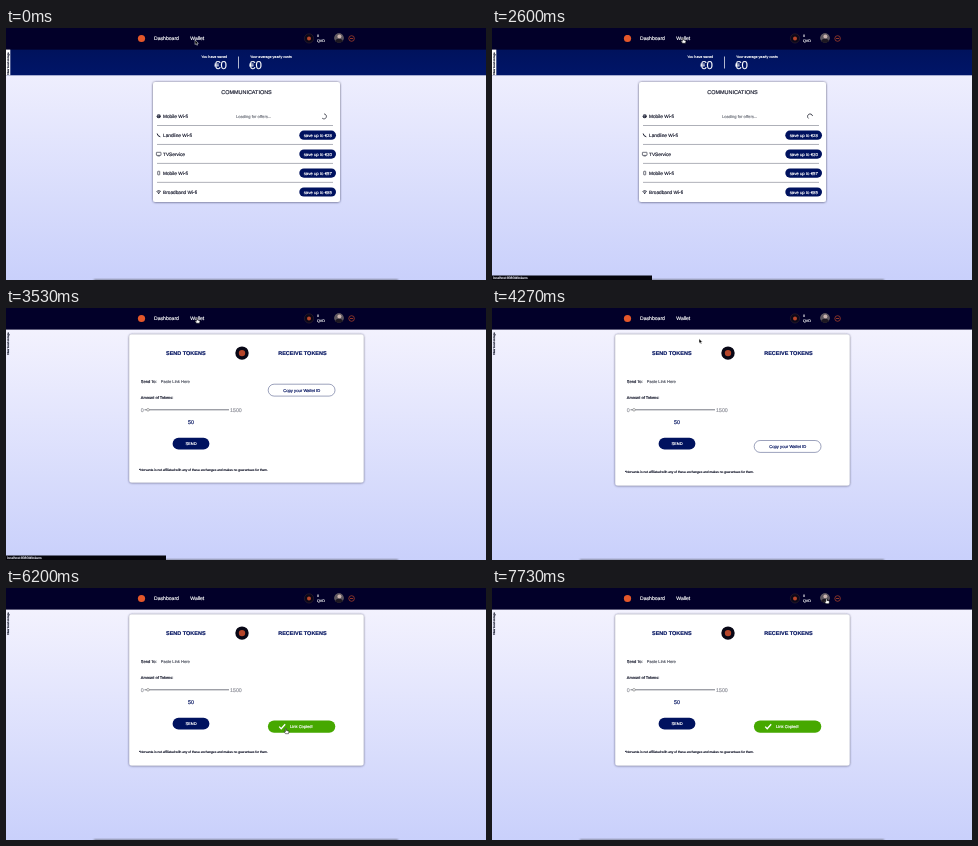
Write an HTML page that moves like this. It is 480 by 252 pixels and loops after 8 s.

```html
<!DOCTYPE html>
<html lang="en">
<head>
<meta charset="utf-8">
<title>Wallet walkthrough</title>
<style>
  html, body { margin: 0; width: 100%; height: 100%; overflow: hidden; background: #d0d6fc; }
  svg { display: block; width: 100vw; height: 100vh; }
  text { font-family: "Liberation Sans", Arial, sans-serif; text-rendering: geometricPrecision; }
</style>
</head>
<body>
<svg id="stage" viewBox="0 0 480 252" xmlns="http://www.w3.org/2000/svg">
  <defs>
    <linearGradient id="sky" x1="0" y1="0" x2="0" y2="1">
      <stop offset="0" stop-color="#f3f2fe"/>
      <stop offset="1" stop-color="#c9d0fb"/>
    </linearGradient>
    <linearGradient id="bar" x1="0" y1="0" x2="0" y2="1">
      <stop offset="0" stop-color="#00125c"/>
      <stop offset="1" stop-color="#001568"/>
    </linearGradient>
    <filter id="soft" x="-5%" y="-5%" width="110%" height="110%">
      <feDropShadow dx="0" dy="0.2" stdDeviation="1.1" flood-color="#20243c" flood-opacity=".8"/>
    </filter>
    <filter id="blur" x="-5%" y="-400%" width="110%" height="900%">
      <feGaussianBlur stdDeviation="1 .5"/>
    </filter>
    <clipPath id="face"><circle cx="333" cy="10" r="5"/></clipPath>
  </defs>
  <rect y="21" width="480" height="231" fill="url(#sky)"/>
  <g id="offers"></g>
  <g id="wallet"></g>
  <g id="header"></g>
  <rect x="88" y="250.6" width="304" height="1.4" fill="#8d92aa" opacity=".75" filter="url(#blur)"/>
  <g id="status"></g>
  <g id="pointer"></g>
</svg>
<script>
const LOOP = 8000;
const NAVY = '#00125f', INK = '#15182b', ORANGE = '#e4572a', RUST = '#b5452a';
const $ = id => document.getElementById(id);
const show = (el, on) => el.setAttribute('display', on ? 'inline' : 'none');

// Text placed by its vertical middle, thickened by a hairline stroke
const text = (s, x, y, size, fill = INK, extra = '') =>
  `<text x="${x}" y="${(y + size * 0.36).toFixed(2)}" font-size="${size}" fill="${fill}" ` +
  `stroke="${fill}" stroke-width=".16" ${extra}>${s}</text>`;
const MID = 'text-anchor="middle"', END = 'text-anchor="end"', BOLD = 'font-weight="700"';
const rect = (x, y, w, h, r, fill, extra = '') =>
  `<rect x="${x}" y="${y}" width="${w}" height="${h}" rx="${r}" fill="${fill}" ${extra}/>`;
const dot = (x, y, r, fill, extra = '') =>
  `<circle cx="${x}" cy="${y}" r="${r}" fill="${fill}" ${extra}/>`;
const line = (d, stroke, width, extra = '') =>
  `<path d="${d}" fill="none" stroke="${stroke}" stroke-width="${width}" ${extra}/>`;
const sideLabel = () =>
  `<g transform="translate(2.4 47) rotate(-90)">${text('Clear local storage', 0, 0, 2.7)}</g>`;

function drawHeader() {
  $('header').innerHTML =
    rect(0, 0, 480, 21.6, 0, '#020029') +
    dot(135.5, 10.5, 3.6, ORANGE) +
    text('Dashboard', 148, 10.4, 5.1, '#fff') +
    text('Wallet', 184.3, 10.4, 5.1, '#fff') +
    dot(303, 10.4, 4.6, '#0b0718', 'stroke="#3a2836" stroke-width=".5"') +
    dot(303, 10.4, 2, RUST) +
    text('0', 311, 8, 3.6, '#fff') +
    text('QVD', 311, 12.8, 3.6, '#fff') +
    `<g clip-path="url(#face)">${dot(333, 10, 5, '#5d565f')}${dot(333.4, 8.4, 2, '#c9b3ae')}` +
    `<ellipse cx="333" cy="14.8" rx="4.2" ry="4" fill="#1d1822"/></g>` +
    dot(345.6, 10.5, 2.8, 'none', `stroke="${RUST}" stroke-width=".7"`) +
    line('M344 10.5H347.2', RUST, .8);
}

function drawOffers() {
  const icons = [
    dot(0, 0, 2, INK) + line('M-1.7 -.4H1.4M-.2 -1.8Q-1.2 0 .2 1.7', '#c8cbd8', .4),
    line('M-1.5 -1.6Q-1.3 1 1.6 1.6', INK, 1),
    rect(-2.3, -1.8, 4.6, 3.1, .4, 'none', `stroke="${INK}" stroke-width=".6"`) + line('M-1.2 2H1.2', INK, .5),
    rect(-1, -1.8, 2, 3.6, .4, 'none', `stroke="${INK}" stroke-width=".6"`),
    line('M-2.2 -.5Q0 -2.3 2.2 -.5M-1.3 .5Q0 -.6 1.3 .5', INK, .8) + dot(0, 1.4, .6, INK)
  ];
  const names = ['Mobile Wi-fi', 'Landline Wi-fi', 'TVService', 'Mobile Wi-fi', 'Broadband Wi-fi'];
  const savings = [0, 28, 30, 57, 85];
  const rows = names.map((name, i) => {
    const y = 88.2 + i * 18.95;
    return `<g transform="translate(152.7 ${y})">${icons[i]}</g>` +
      text(name, 157, y, 4.75) +
      (i < 4 ? line(`M151 ${y + 9.3}H327`, '#777b88', .6) : '') +
      (i ? rect(293.3, y - 4.6, 36.7, 9.2, 4.6, NAVY) +
        text('save up to €' + savings[i], 311.8, y, 4.3, '#fff', MID) : '');
  }).join('');
  $('offers').innerHTML =
    rect(0, 21, 480, 26.3, 0, 'url(#bar)') +
    rect(0, 21, 4.3, 26.3, 0, '#fff') + sideLabel() +
    text('You have saved', 221, 28.6, 3.65, '#fff', END) +
    text('€0', 221, 36.6, 11.5, '#fff', END) +
    line('M232.5 28.5V40.5', '#fff', .7) +
    text('Your average yearly costs', 244, 28.6, 3.65, '#fff') +
    text('€0', 243, 36.6, 11.5, '#fff') +
    rect(147, 54, 187, 120, 2.5, '#fff', 'filter="url(#soft)"') +
    text('COMMUNICATIONS', 240.5, 64, 5.46, INK, MID) +
    rows +
    text('Loading for offers...', 230, 88.4, 4.1, '#777b84') +
    '<path id="spin" d="M318 85.9A2.5 2.5 0 1 1 316.2 90.2" fill="none" stroke="#30333f" stroke-width=".8"/>';
}

function drawWallet() {
  $('wallet').innerHTML = sideLabel() +
    rect(123.3, 26.6, 234.3, 148, 2.5, '#fff', 'id="panel" filter="url(#soft)"') +
    text('SEND TOKENS', 160, 45.4, 5.5, NAVY, BOLD) +
    text('RECEIVE TOKENS', 272.2, 45.4, 5.5, NAVY, BOLD) +
    dot(236, 45.1, 6.7, '#080716') + dot(236, 45.1, 3.2, RUST) +
    text('Send To:', 134.8, 73.2, 4.05) +
    text('Paste Link Here', 154.8, 73.4, 4.08, '#555966') +
    text('Amount of Tokens:', 134.8, 89.8, 3.95) +
    text('0', 134.8, 101.9, 5.3, '#8e9099') +
    line('M138.5 101.8H223', '#676a74', .9) +
    dot(142, 101.8, 1.3, '#fff', 'stroke="#777" stroke-width=".6"') +
    text('1500', 224, 101.9, 5.3, '#8e9099') +
    text('50', 185, 114, 5.4, NAVY, MID) +
    rect(166.6, 129.8, 36.8, 11.8, 5.9, NAVY) +
    text('SEND', 185, 135.7, 4, '#fff', MID) +
    '<g id="note">' + text('*Norvanta is not affiliated with any of these exchanges and makes no guarantees for them.',
      133, 161.5, 3.22) + '</g>' +
    '<g id="copy">' +
    rect(262.2, 76.2, 66.8, 11.9, 5.9, '#fff', 'stroke="#59648f" stroke-width=".6"') +
    text('Copy your Wallet ID', 295.7, 82.2, 4.2, NAVY, MID) + '</g>' +
    '<g id="copied">' +
    rect(261.9, 132.4, 67.4, 12.3, 6.1, '#46a800') +
    line('M273.2 138.6L275.2 140.7L279.2 136.2', '#fff', 1.3) +
    text('Link Copied!', 284, 138.6, 4.1, '#fff') + '</g>';
}

function drawOverlays() {
  $('status').innerHTML = rect(0, 247.5, 160, 4.5, 0, '#05050c') +
    text('localhost:8080/#/tokens', 1, 249.8, 3.3, '#d6d8e2');
  $('pointer').innerHTML =
    '<path id="arrow" d="M0 0V4.6L1.1 3.6L1.9 5.3L2.7 4.9L2 3.3H3.4Z" fill="#000" stroke="#fff" stroke-width=".45"/>' +
    '<path id="hand" d="M-.6 .2Q0 -.6 .5 .2V2L2.4 2.4Q3.1 2.6 2.9 3.5L2.5 5.2H-.5L-2 3.2Q-1.6 2.6 -.6 3.2Z" fill="#fff" stroke="#000" stroke-width=".5"/>';
}

// Pointer stops: time, x, y
const path = [
  [0, 189, 12], [2000, 189, 12], [2130, 191, 10], [4070, 191, 10], [4530, 230.5, 61],
  [4720, 230.5, 61], [4930, 264, 103], [5530, 280, 140.5], [6500, 280, 140.5],
  [7130, 334.5, 10.5], [LOOP, 334.5, 10.5]
];
function pointerAt(t) {
  const i = Math.max(1, path.findIndex(p => p[0] > t));
  const [t0, x0, y0] = path[i - 1], [t1, x1, y1] = path[i];
  const u = (t - t0) / (t1 - t0), e = u * u * (3 - 2 * u);
  return [x0 + (x1 - x0) * e, y0 + (y1 - y0) * e];
}

function render(t) {
  const onWallet = t >= 3530, grown = t >= 3600, copied = t >= 6200;
  show($('offers'), !onWallet);
  show($('wallet'), onWallet);
  show($('status'), t >= 2070 && t < 4200);

  // The loader stalls briefly before the page switch
  const spinTime = t > 1530 && t < 1870 ? 1530 : t;
  $('spin').setAttribute('transform', `rotate(${spinTime * 0.36 % 360} 318 88.4)`);

  $('panel').setAttribute('height', grown ? 151 : 148);
  $('note').setAttribute('transform', `translate(0 ${grown ? 2.8 : 0})`);
  $('copy').setAttribute('transform', `translate(0 ${grown ? 56.3 : 0})`);
  show($('copy'), !copied);
  show($('copied'), copied);

  const hand = (t >= 2070 && t < 4130) || (t >= 5600 && t < 6600) || t >= 7100;
  show($('hand'), hand);
  show($('arrow'), !hand);
  const [x, y] = pointerAt(t);
  $('pointer').setAttribute('transform', `translate(${x.toFixed(2)} ${y.toFixed(2)})`);
}

drawHeader();
drawOffers();
drawWallet();
drawOverlays();
const start = performance.now();
function tick() {
  render((performance.now() - start) % LOOP);
  requestAnimationFrame(tick);
}
render(0);
requestAnimationFrame(tick);
</script>
</body>
</html>
```
